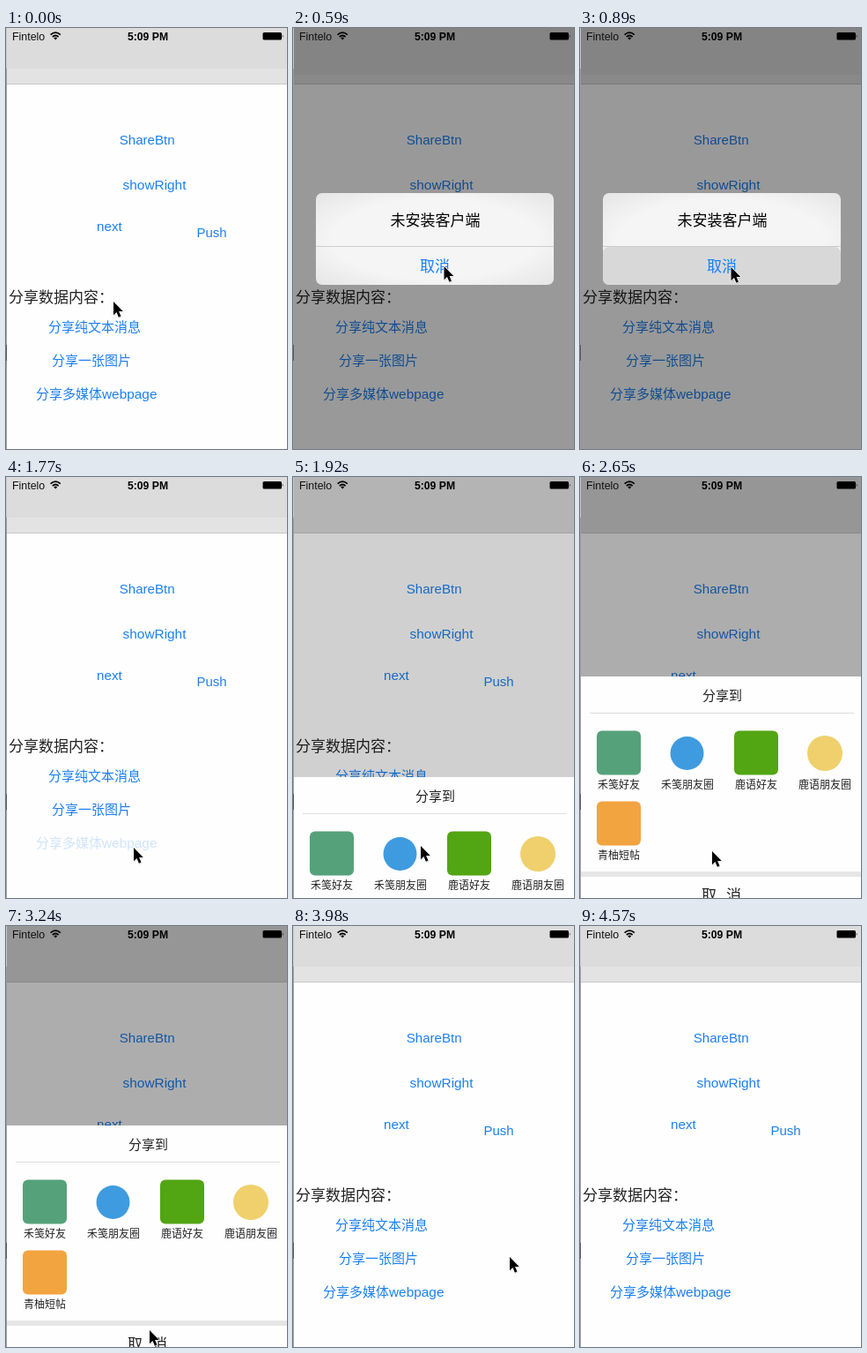
Write an HTML page that moves like this. It is 319x477 px and loops after 4840 ms.

```html
<!DOCTYPE html>
<html lang="zh-CN">
<head>
<meta charset="utf-8">
<title>Share sheet demo</title>
<style>
html, body { margin: 0; width: 100%; height: 100%; overflow: hidden; background: #fff; }
svg { display: block; width: 319px; height: 477px; }
text { font-family: "Liberation Sans", "Noto Sans CJK SC", "Noto Sans CJK", sans-serif; font-size: 15px; }
.link { fill: #1c7fee; }
.mid { text-anchor: middle; }
.label { font-size: 12px; fill: #222; text-anchor: middle; }
.big { font-size: 17px; }
</style>
</head>
<body>
<svg viewBox="0 0 319 477" xmlns="http://www.w3.org/2000/svg">
  <defs>
    <radialGradient id="frost" r="0.72">
      <stop offset="0.6" stop-color="#f5f5f5"/>
      <stop offset="1" stop-color="#e4e4e4"/>
    </radialGradient>
  </defs>

  <rect width="319" height="477" fill="#fefefe"/>
  <rect width="319" height="63" fill="#dcdcdc"/>
  <rect id="strip" y="46" width="319" height="17" fill="#e3e3e3"/>
  <rect y="63" width="319" height="1" fill="#c8c8c8"/>

  <g class="link">
    <text x="128.7" y="132" style="font-size:15.1px">ShareBtn</text>
    <text x="132.6" y="183" style="font-size:15.4px">showRight</text>
    <text x="103" y="230" style="font-size:15.2px">next</text>
    <text x="216.5" y="237">Push</text>
    <text id="plain" x="48" y="344">分享纯文本消息</text>
    <text x="52" y="382">分享一张图片</text>
    <g id="media">
      <text x="34" y="420">分享多媒体</text>
      <text x="109" y="419.5" style="font-size:15.4px">webpage</text>
    </g>
  </g>
  <text class="big" x="3" y="311" fill="#222">分享数据内容：</text>

  <rect id="dim" x="1" width="318" height="477"/>

  <g id="status">
    <text x="7" y="14" style="font-size:12.4px" fill="#111">Fintelo</text>
    <text class="mid" x="161" y="14" style="font-size:12.2px" font-weight="700">5:09 PM</text>
    <g fill="none" stroke="#000" stroke-width="1.7">
      <path d="M50.6 7.6Q56.2 2.6 61.8 7.6"/>
      <path d="M52.8 10Q56.2 7 59.6 10"/>
    </g>
    <path d="M54.2 11.3Q56.2 9.9 58.2 11.3L56.2 13.6Z"/>
    <rect x="291.5" y="5" width="21.5" height="8.6" rx="1.6"/>
    <path d="M313.8 7.6Q315.4 9.3 313.8 11Z"/>
  </g>

  <g id="alert">
    <rect x="26" y="187" width="270" height="104" rx="7" fill="url(#frost)"/>
    <rect x="26" y="247" width="270" height="1" fill="#cdcdcd"/>
    <rect id="press" x="26" y="248" width="270" height="43" rx="7" fill="#d8d8d8"/>
    <text class="big mid" x="161.5" y="223.5">未安装客户端</text>
    <text class="big mid" x="161" y="276" fill="#1480fa">取消</text>
  </g>

  <g id="sheet">
    <rect x="1" width="318" height="300" fill="#fefefe"/>
    <text class="mid" x="161.5" y="26.5" fill="#222">分享到</text>
    <rect x="11" y="41" width="300" height="1" fill="#dedede"/>
    <rect x="19" y="61.5" width="50" height="50" rx="6" fill="#55a27a"/>
    <circle cx="121.5" cy="87" r="19" fill="#3f9bdf"/>
    <rect x="175" y="61.5" width="50" height="50" rx="6" fill="#52a513"/>
    <circle cx="278" cy="87" r="20" fill="#efd06c"/>
    <rect x="19" y="141.5" width="50" height="50" rx="6" fill="#f2a440"/>
    <text class="label" x="44" y="126.5">禾笺好友</text>
    <text class="label" x="122" y="126.5">禾笺朋友圈</text>
    <text class="label" x="200" y="126.5">鹿语好友</text>
    <text class="label" x="278" y="126.5">鹿语朋友圈</text>
    <text class="label" x="44" y="206.5">青柚短帖</text>
    <rect x="1" y="221" width="318" height="6" fill="#e6e6e6"/>
    <g id="cancel" class="big" fill="#222">
      <text class="big" x="138" y="253.5">取</text>
      <text class="big" x="166" y="253.5">消</text>
    </g>
  </g>

  <rect width="1" height="46" fill="#c4c4c4"/>
  <rect y="46" width="1" height="431" fill="#9a9a9a"/>
  <rect y="359" width="1" height="18" fill="#555"/>

  <g id="cursor" stroke-linejoin="round">
    <path d="M0 0V15.3L3.5 12.1 5.9 17.7 8.5 16.6 6.1 11.1H10.8Z" transform="translate(.8 1.2)" fill="#000" opacity=".2"/>
    <path d="M0 0V15.3L3.5 12.1 5.9 17.7 8.5 16.6 6.1 11.1H10.8Z" stroke="#fff" stroke-width="1.4" paint-order="stroke"/>
  </g>
</svg>
<script>
const LOOP = 4840, TICK = 147.4;
const $ = id => document.getElementById(id);

// Linear value at step k between [step, value...] points.
function track(points, k, i = 1) {
  let a = points[0];
  for (const b of points) {
    if (k < b[0]) return a === b ? b[i] : a[i] + (b[i] - a[i]) * (k - a[0]) / (b[0] - a[0]);
    a = b;
  }
  return a[i];
}

const pointer = [
  [0, 122, 310], [1, 113, 335], [2, 118, 334], [4, 171.5, 270], [6, 171.5, 271],
  [8, 165, 310], [11, 147, 414], [12, 145, 420], [13, 145, 418], [14, 147, 411],
  [18, 150, 424], [22, 163, 458], [24, 166, 456], [27, 246, 375],
  [28, 256, 410], [29, 266, 458], [30, 269, 468]
];
const alertFade = [[1, 0], [2, .5], [3, 1], [6, 1], [7, .5], [8, 0]];
const sheetTop = [[12, 477], [13, 340], [14, 230], [15, 226], [23, 226], [24, 340], [25, 477]];
const sheetDim = [[12, 0], [13, .18], [14, .32], [23, .32], [24, .16], [25, 0]];

function draw(time) {
  const k = Math.floor((time % LOOP + 4) / TICK);
  const alert = track(alertFade, k), top = track(sheetTop, k), shade = track(sheetDim, k);

  $("alert").setAttribute("opacity", alert);
  $("press").setAttribute("opacity", k === 6 ? 1 : 0);
  $("sheet").setAttribute("transform", `translate(0 ${top})`);
  $("dim").setAttribute("opacity", Math.max(alert * .4, shade));

  const edge = alert > 0 ? 53 : 46;
  $("strip").setAttribute("y", edge);
  $("strip").setAttribute("height", 63 - edge);
  $("strip").setAttribute("opacity", shade > 0 ? 0 : 1);

  $("plain").setAttribute("opacity", k === 1 ? .2 : 1);
  $("media").setAttribute("opacity", k === 12 ? .2 : 1);
  $("cancel").setAttribute("opacity", k === 23 ? .4 : 1);

  $("cursor").setAttribute("transform", `translate(${track(pointer, k)} ${track(pointer, k, 2)})`);
  $("cursor").setAttribute("visibility", k > 30 ? "hidden" : "visible");
}

const start = performance.now();
function loop() {
  draw(performance.now() - start);
  requestAnimationFrame(loop);
}
loop();
</script>
</body>
</html>
```
